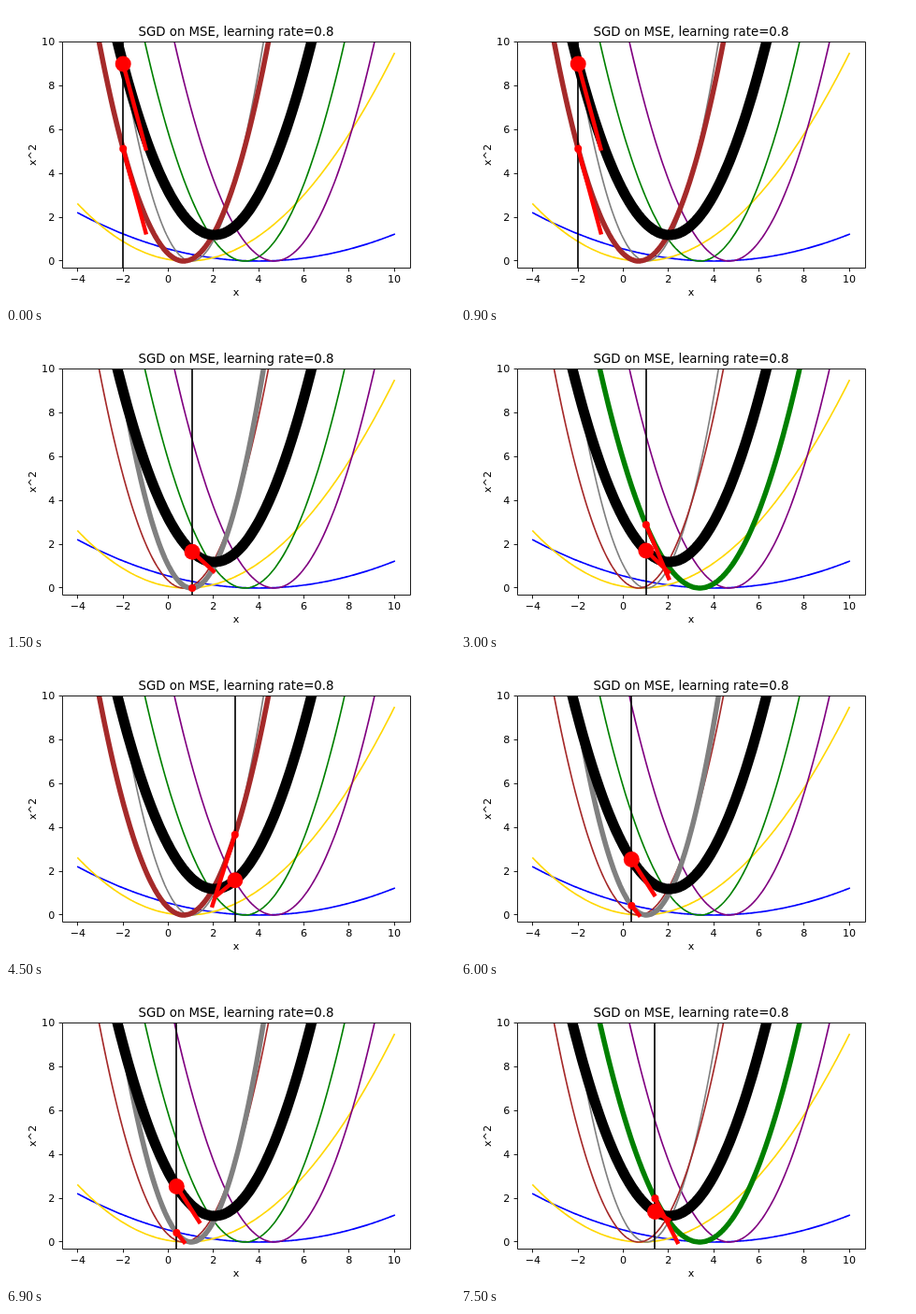
Recreate the animation shown at these times as an HTML page with a canvas. Size 480 by 320 pixels, loop 8000 ms.

```html
<!DOCTYPE html>
<html lang="en">
<head>
<meta charset="utf-8">
<title>SGD on MSE</title>
<style>
  html, body { margin: 0; width: 100%; height: 100%; overflow: hidden; background: #fff; }
  canvas { display: block; width: 480px; height: 320px; }
</style>
</head>
<body>
<canvas id="plot" width="480" height="320"></canvas>
<script>
const ctx = document.getElementById('plot').getContext('2d');
const LOOP = 8000, STEP = 1500, RATE = 0.8;
const PT = 80 / 72;
const box = { left: 60, right: 432, top: 38.4, bottom: 280 };
const px = x => box.left + (x + 4.7) * (box.right - box.left) / 15.4;
const py = y => box.top + (10 - y) * (box.bottom - box.top) / 10.3;

// One squared error per sample: a * (x - c)^2
const parabola = (color, slope, c) => {
  const a = slope * slope;
  return { color, f: x => a * (x - c) ** 2, d: x => 2 * a * (x - c) };
};
const blue = parabola('blue', 0.1848, 4.02);
const gold = parabola('gold', 0.335, 0.813);
const green = parabola('green', 0.7154, 3.38);
const purple = parabola('purple', 0.714, 4.697);
const gray = parabola('gray', 0.9925, 1.025);
const brown = parabola('brown', 0.844, 0.682);
const losses = [blue, gold, green, purple, gray, brown];

const average = key => x => losses.reduce((sum, l) => sum + l[key](x), 0) / losses.length;
const mean = { color: 'black', f: average('f'), d: average('d') };

// Run the descent once; each step uses a single sample.
let weight = -2;
const steps = [brown, gray, green, brown, gray, green].map(loss => {
  const step = { x: weight, loss };
  weight -= RATE * loss.d(weight);
  return step;
});

function line(points, color, width, cap = 'square') {
  ctx.beginPath();
  for (const [x, y] of points) ctx.lineTo(x, y);
  ctx.strokeStyle = color;
  ctx.lineWidth = width;
  ctx.lineCap = cap;
  ctx.lineJoin = 'round';
  ctx.stroke();
}

function curve({ f, color }, points) {
  const path = [];
  for (let i = 0; i <= 200; i++) {
    const x = -4 + 14 * i / 200;
    path.push([px(x), py(f(x))]);
  }
  line(path, color, points * PT);
}

function tangent({ f, d }, x) {
  const y = f(x), g = d(x), size = Math.abs(g);
  const dx = -Math.sign(g) * Math.min(1, size, y / size);
  line([[px(x), py(y)], [px(x + dx), py(y + g * dx)]], 'red', 4 * PT);
}

function dot(x, y, r) {
  ctx.fillStyle = 'red';
  ctx.beginPath();
  ctx.arc(px(x), py(y), r, 0, 2 * Math.PI);
  ctx.fill();
}

function label(text, x, y, size = 10, align = 'center') {
  ctx.font = `${size * PT}px "DejaVu Sans", sans-serif`;
  ctx.textAlign = align;
  ctx.fillStyle = '#000';
  ctx.fillText(text, x, y);
}

function axes() {
  const snap = v => Math.floor(v) + 0.5;
  const width = 0.8 * PT, tick = 3.5 * PT;
  ctx.strokeStyle = '#000';
  ctx.lineWidth = width;
  ctx.strokeRect(60.5, 38.5, 372, 242);
  for (let v = -4; v <= 10; v += 2) {
    const x = snap(px(v)), y = snap(py(v));
    const text = String(v).replace('-', '\u2212');
    line([[x, 280.5], [x, 280.5 + tick]], '#000', width, 'butt');
    label(text, px(v), 296);
    if (v < 0) continue;
    line([[60.5, y], [60.5 - tick, y]], '#000', width, 'butt');
    label(text, 52.2, py(v) + 4, 10, 'right');
  }
  label('x', 246, 310);
  label('SGD on MSE, learning rate=0.8', 246, 32, 12);
  ctx.save();
  ctx.translate(32, 159.5);
  ctx.rotate(-Math.PI / 2);
  label('x^2', 0, 0);
  ctx.restore();
}

function draw(time) {
  const { x, loss } = steps[Math.floor(time % LOOP / STEP)];
  ctx.fillStyle = '#fff';
  ctx.fillRect(0, 0, 480, 320);
  ctx.save();
  ctx.beginPath();
  ctx.rect(box.left, box.top, box.right - box.left, box.bottom - box.top);
  ctx.clip();
  losses.forEach(l => curve(l, 1.5));
  curve(loss, 5);
  curve(mean, 10);
  const at = Math.round(px(x));
  line([[at, box.top], [at, box.bottom]], '#000', 1.5 * PT);
  tangent(loss, x);
  tangent(mean, x);
  dot(x, loss.f(x), 4);
  dot(x, mean.f(x), 8.5);
  ctx.restore();
  axes();
}

const start = performance.now();
function tick() {
  draw(performance.now() - start);
  requestAnimationFrame(tick);
}
tick();
</script>
</body>
</html>
```
